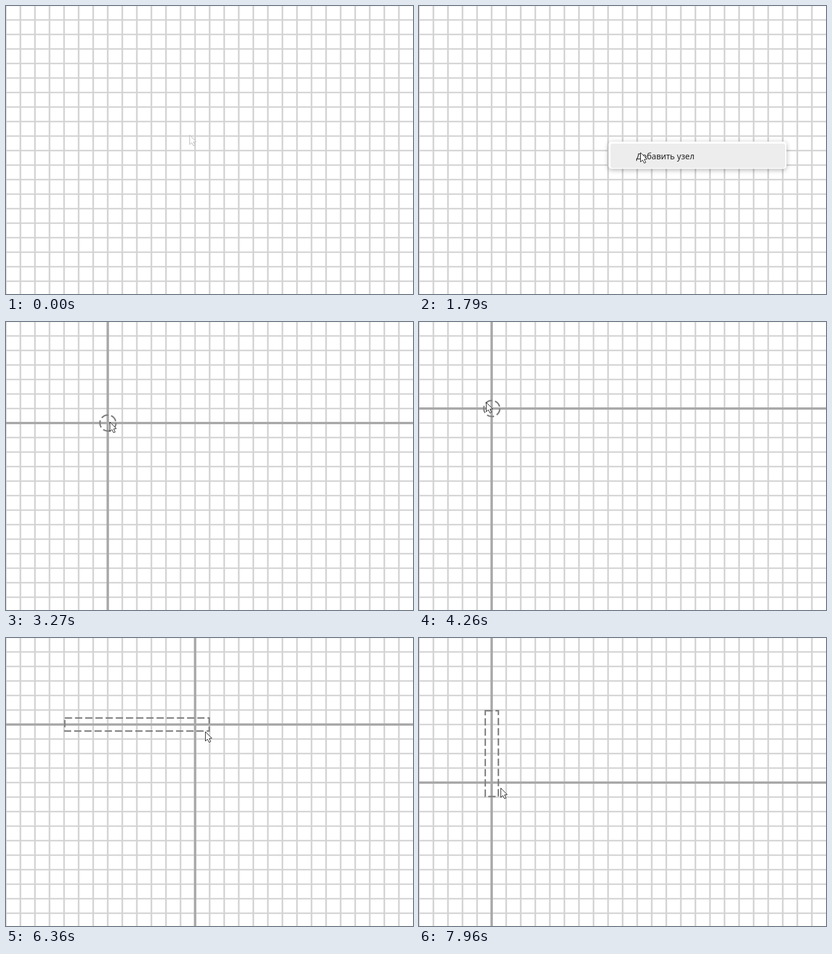
Write an HTML page with a canvas that moves like this. It is 699 by 496 pixels and loops after 7990 ms.

```html
<!DOCTYPE html>
<html lang="ru">
<head>
<meta charset="utf-8">
<style>
html, body { margin: 0; width: 100%; height: 100%; overflow: hidden; background: #fff; }
canvas { display: block; }
</style>
</head>
<body>
<canvas id="stage" width="699" height="496"></canvas>
<script>
const ctx = document.getElementById('stage').getContext('2d');
const W = 699, H = 496, CELL = 25, LOOP = 7990;
const RIGHT_CLICK = 560, MENU_IN = 730, MENU_OUT = 2330, DRAG_START = 4575;
const ANCHOR = { x: 125, y: 149 };
const arrow = new Path2D('M0 0V16L3.6 12.8L6.3 18.2L9 17L6.4 11.6L11 11.2Z');

// skew shifts the easing in time, bend curves the way
const moves = [
  { from: 1510, to: 1790, x: 380, y: 252 },
  { from: 2825, to: 3490, x: 110, y: 132, bend: 1.4 },
  { from: 3940, to: 4090, x: 115, y: 138 },
  { from: 4250, to: 4410, x: 119, y: 144 },
  { from: 4720, to: 5570, x: 392, y: 161, skew: 1.32, bend: 0.36 },
  { from: 6120, to: 7110, x: 134, y: 168, skew: 0.9, bend: 3 },
  { from: 7390, to: LOOP, x: 141, y: 259 }
];

const clamp01 = v => Math.max(0, Math.min(1, v));
const smooth = u => u * u * (3 - 2 * u);

function pointerAt(t) {
  let x = 315, y = 222;
  for (const { from, to, x: endX, y: endY, skew = 1, bend = 1 } of moves) {
    const progress = smooth(clamp01((t - from) / (to - from)) ** skew);
    x += (endX - x) * progress;
    y += (endY - y) * progress ** bend;
  }
  return { x, y };
}

function line(x1, y1, x2, y2, color, width) {
  ctx.strokeStyle = color;
  ctx.lineWidth = width;
  ctx.beginPath();
  ctx.moveTo(x1, y1);
  ctx.lineTo(x2, y2);
  ctx.stroke();
}

const vertical = (x, color, width) => line(x - 0.25, 0, x - 0.25, H, color, width);
const horizontal = (y, color, width) => line(0, y, W, y, color, width);

function drawGrid() {
  for (let x = 0; x <= W; x += CELL) vertical(x, 'lightgray', 2.8);
  for (let y = -1; y <= H; y += CELL) horizontal(y, 'lightgray', 2.6);
}

function drawNode(t, x, y) {
  let cx, cy, cols = 0, rows = 0;
  if (t < DRAG_START) {
    cx = Math.round((x + 3) / CELL) * CELL;
    cy = Math.round((y + 6) / CELL) * CELL - 1;
  } else {
    cols = Math.max(0, Math.floor((x - ANCHOR.x - 5) / CELL));
    rows = Math.max(0, Math.floor((y - ANCHOR.y - 5) / CELL));
    cx = ANCHOR.x + cols * CELL;
    cy = ANCHOR.y + rows * CELL;
  }
  vertical(cx, 'darkgray', 4.2);
  horizontal(cy, 'darkgray', 4.2);

  ctx.strokeStyle = 'gray';
  ctx.lineWidth = 2.5;
  ctx.setLineDash([12.5, 5]);
  ctx.beginPath();
  if (cols) ctx.rect(101, 137.8, cx - 77, 22.5);
  else if (rows) ctx.rect(113.8, 125.3, 22.5, cy - 101.3);
  else ctx.arc(cx, cy, 13.75, 0, Math.PI * 2);
  ctx.stroke();
  ctx.setLineDash([]);
}

function panel(x, y, w, h, r, fill) {
  ctx.fillStyle = fill;
  ctx.beginPath();
  ctx.roundRect(x, y, w, h, r);
  ctx.fill();
}

function drawMenu(opacity, hovered) {
  ctx.save();
  ctx.globalAlpha = opacity;
  ctx.shadowColor = 'rgba(0,0,0,.3)';
  ctx.shadowBlur = 8;
  ctx.shadowOffsetY = 2;
  panel(325.5, 233.5, 305.5, 47, 5, '#fff');
  ctx.shadowColor = 'transparent';
  if (hovered) panel(329, 237, 300, 42, 4, '#ededed');
  ctx.fillStyle = '#232323';
  ctx.font = '14px "Noto Sans", sans-serif';
  ctx.fillText('Добавить узел', 373, 264);
  ctx.restore();
}

function drawPointer(x, y, color) {
  ctx.save();
  ctx.translate(Math.floor(x) + 0.5, Math.floor(y) + 0.5);
  ctx.fillStyle = '#fff';
  ctx.fill(arrow);
  ctx.strokeStyle = color;
  ctx.lineWidth = 1;
  ctx.stroke(arrow);
  ctx.restore();
}

function render(t) {
  const { x, y } = pointerAt(t);
  ctx.fillStyle = '#fff';
  ctx.fillRect(0, 0, W, H);
  drawGrid();
  if (t >= MENU_OUT) drawNode(t, x, y);

  if (t >= RIGHT_CLICK && t < 860) {
    ctx.fillStyle = `rgba(128,128,128,${0.2 * clamp01((860 - t) / 130)})`;
    ctx.beginPath();
    ctx.arc(315, 222, 15, 0, Math.PI * 2);
    ctx.fill();
  }

  const opacity = clamp01((t - MENU_IN + 30) / 150) * clamp01((2470 - t) / 140);
  if (t >= MENU_IN && opacity > 0) drawMenu(opacity, x > 326 && y > 234);
  drawPointer(x, y, t < RIGHT_CLICK ? '#b8b8b8' : '#1c1c1c');
}

const start = performance.now();
function tick() {
  render((performance.now() - start) % LOOP);
  requestAnimationFrame(tick);
}
tick();
</script>
</body>
</html>
```
